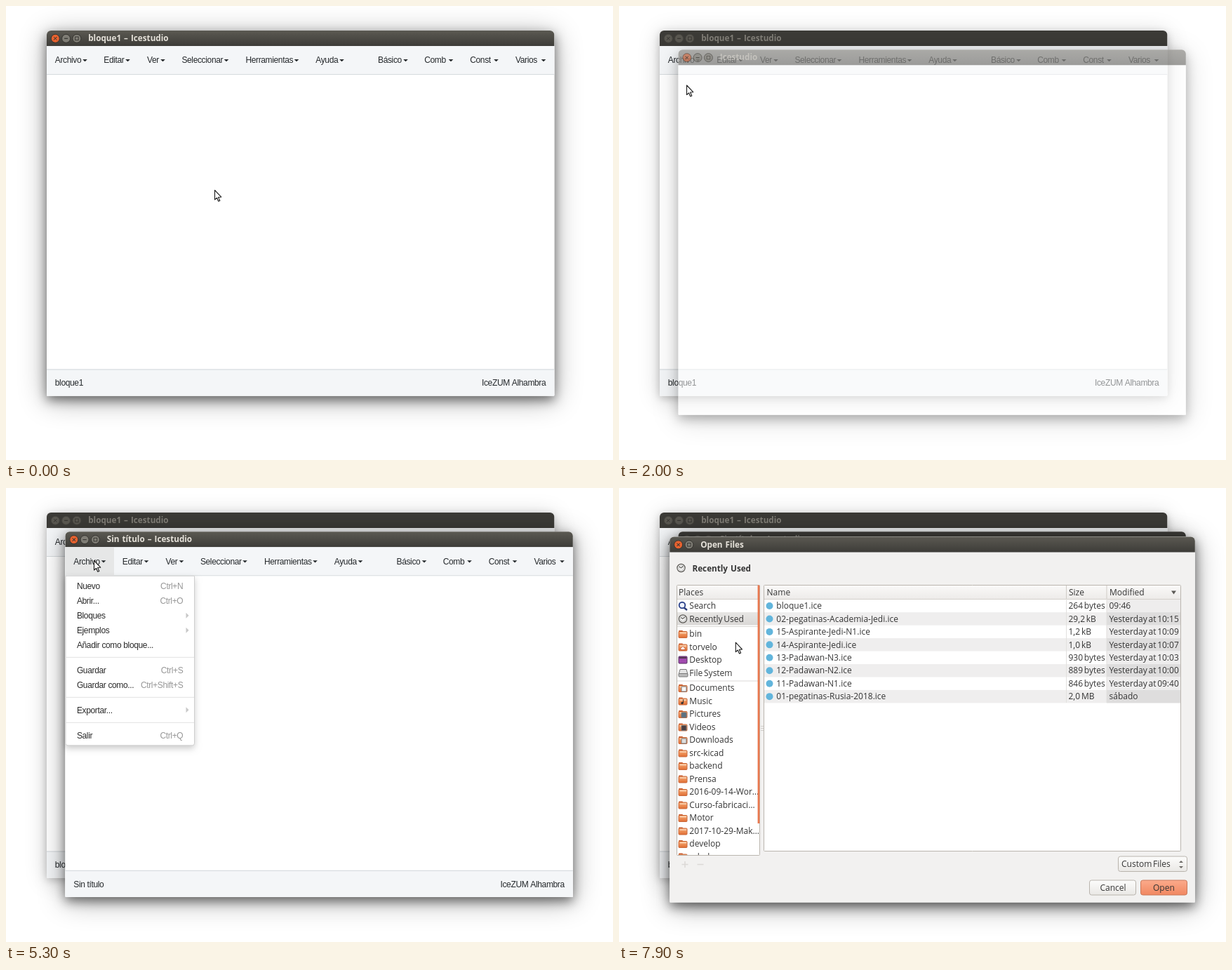
An HTML page with a canvas for the animation above (8 s loop, 865 px wide and 647 px high).

```html
<!DOCTYPE html>
<html lang="es">
<head>
<meta charset="utf-8">
<title>Icestudio</title>
<style>
  html, body { margin: 0; width: 100%; height: 100%; overflow: hidden; background: #fff; }
  canvas { display: block; }
</style>
</head>
<body>
<canvas id="stage" width="865" height="647"></canvas>
<script>
const c = document.getElementById('stage').getContext('2d');
const LOOP = 8000;
const APP = { font: '12px "Liberation Sans", Arial, sans-serif', letterSpacing: '-0.36px', wordSpacing: '0px' };
const UI = { font: '12px "Open Sans", "Noto Sans", sans-serif', letterSpacing: '0px', wordSpacing: '-1.4px' };
const BOLD = { font: 'bold 11.7px "Open Sans", "Noto Sans", sans-serif', letterSpacing: '0px', wordSpacing: '1px' };

// label, label x, caret x
const NAV = [
  ['Archivo', 69.8, 112.5], ['Editar', 139.3, 173.5], ['Ver', 201, 223.5],
  ['Seleccionar', 250.4, 314], ['Herramientas', 341.4, 414], ['Ayuda', 441.3, 478.5],
  ['Básico', 530, 569.5], ['Comb', 596.2, 634], ['Const', 661.2, 698.5], ['Varios', 726, 766]
];
// label, row centre, shortcut ('>' opens a submenu)
const MENU = [
  ['Nuevo', 112.5, 'Ctrl+N'], ['Abrir...', 133.5, 'Ctrl+O'], ['Bloques', 154.5, '>'],
  ['Ejemplos', 175.5, '>'], ['Añadir como bloque...', 196.5, ''], ['Guardar', 232, 'Ctrl+S'],
  ['Guardar como...', 253, 'Ctrl+Shift+S'], ['Exportar...', 289, '>'], ['Salir', 325, 'Ctrl+Q']
];
// pointer moves: first step, last step, target x, y (one step every 100 ms)
const MOVES = [
  [100, 900, 91, 76], [1200, 1500, 96, 112.5], [3000, 3000, 169, 154], [3300, 3300, 165, 174],
  [3500, 3500, 161.7, 187.5], [4800, 4900, 137, 123], [5100, 5100, 125, 103],
  [5700, 5800, 153, 175], [6300, 6300, 153, 273.5], [6500, 6500, 158, 275],
  [6800, 6800, 158, 205], [7000, 7100, 161, 212.5], [7500, 7500, 175, 219], [7600, 7600, 165.8, 219.7]
];
// hovered menu row from each time on
const HOVER = [[0, -1], [1400, 0], [1800, -1], [5700, 0], [5800, 1], [6300, 6], [6800, -1], [7000, 3], [7100, 4]];
const FILES = [
  ['bloque1.ice', '264 bytes', '09:46'],
  ['02-pegatinas-Academia-Jedi.ice', '29,2 kB', 'Yesterday at 10:15'],
  ['15-Aspirante-Jedi-N1.ice', '1,2 kB', 'Yesterday at 10:09'],
  ['14-Aspirante-Jedi.ice', '1,0 kB', 'Yesterday at 10:07'],
  ['13-Padawan-N3.ice', '930 bytes', 'Yesterday at 10:03'],
  ['12-Padawan-N2.ice', '889 bytes', 'Yesterday at 10:00'],
  ['11-Padawan-N1.ice', '846 bytes', 'Yesterday at 09:40'],
  ['01-pegatinas-Rusia-2018.ice', '2,0 MB', 'sábado']
];
const PLACES = [
  [168, 'Search', 'Recently Used'],
  [208, 'bin', 'torvelo', 'Desktop', 'File System'],
  [285, 'Documents', 'Music', 'Pictures', 'Videos', 'Downloads', 'src-kicad', 'backend', 'Prensa',
    '2016-09-14-Wor…', 'Curso-fabricaci…', 'Motor', '2017-10-29-Mak…', 'develop', 'schola']
];

function rect(x, y, w, h, fill) {
  c.fillStyle = fill;
  c.fillRect(x, y, w, h);
}
function text(s, x, y, style, fill, align = 'left') {
  Object.assign(c, style);
  c.fillStyle = fill;
  c.textAlign = align;
  c.textBaseline = 'alphabetic';
  c.fillText(s, x, y + 4.2);
}
function poly(points, fill, stroke, width = 1) {
  c.beginPath();
  for (let i = 0; i < points.length; i += 2) c.lineTo(points[i], points[i + 1]);
  c.closePath();
  if (fill) { c.fillStyle = fill; c.fill(); }
  if (stroke) { c.strokeStyle = stroke; c.lineWidth = width; c.stroke(); }
}
function line(x1, y1, x2, y2, stroke, width = 1) {
  poly([x1, y1, x2, y2], null, stroke, width);
}
function circle(x, y, r, fill, stroke, width = 1) {
  c.beginPath();
  c.arc(x, y, r, 0, 7);
  if (fill) { c.fillStyle = fill; c.fill(); }
  if (stroke) { c.strokeStyle = stroke; c.lineWidth = width; c.stroke(); }
}
function box(x, y, w, h, r, fill, stroke) {
  c.beginPath();
  c.roundRect(x, y, w, h, r);
  c.fillStyle = fill;
  c.fill();
  if (stroke) { c.strokeStyle = stroke; c.lineWidth = 1; c.stroke(); }
}
function fade(y1, y2, from, to) {
  const g = c.createLinearGradient(0, y1, 0, y2);
  g.addColorStop(0, from);
  g.addColorStop(1, to);
  return g;
}
// shadow of a rounded box, painted only outside the box
function shadow(x, y, w, h, r, alpha, blur, dy) {
  c.save();
  c.beginPath();
  c.rect(-100, -100, 1100, 900);
  c.roundRect(x, y, w, h, r);
  c.clip('evenodd');
  c.shadowColor = `rgba(0,0,0,${alpha})`;
  c.shadowBlur = blur;
  c.shadowOffsetY = dy;
  box(x, y, w, h, r, '#fff');
  c.restore();
}

function frame(x, y, w, h, title, active, fill, glyphs) {
  const corners = [6, 6, 1, 1];
  shadow(x, y, w, h, corners, active ? 0.33 : 0.18, active ? 40 : 32, active ? 6 : 4);
  shadow(x, y, w, h, corners, active ? 0.5 : 0.2, active ? 16 : 12, active ? 6 : 3);
  box(x, y, w, h, corners, fill);
  box(x, y, w, 22, [6, 6, 0, 0], active ? fade(y, y + 22, '#5b5952', '#3d3c38') : '#3c3b37');
  const by = y + 11.3, ink = active ? '#3a3935' : '#3a3834';
  [...glyphs].forEach((g, i) => {
    const bx = x + 12.3 + i * 15.3;
    circle(bx, by, 6, !active ? '#5a5851' : i ? '#7f7d75' : '#e8622f', active ? '#34332f' : '#46443f');
    if (g === 'x') {
      line(bx - 2, by - 2, bx + 2, by + 2, ink);
      line(bx - 2, by + 2, bx + 2, by - 2, ink);
    } else if (g === '-') line(bx - 2.5, by, bx + 2.5, by, ink);
    else { c.strokeStyle = ink; c.lineWidth = 1; c.strokeRect(bx - 2.3, by - 2.3, 4.6, 4.6); }
  });
  text(title, x + 13.3 + glyphs.length * 15.3, y + 10.8, BOLD, active ? '#e6e2da' : '#827f78');
}

// stage: 0 empty, 1 bars, 2 carets, 3 labels, 4 complete
function appWindow(dx, dy, name, active, stage, menuOpen, hover) {
  c.save();
  c.translate(dx, dy);
  frame(58, 35, 723.3, 520.5, stage > 3 ? name + ' – Icestudio' : 'Icestudio', active, '#fff', 'x-o');
  if (stage > 0) {
    rect(58, 57, 723.3, 40, '#f4f6f8');
    rect(58, 97, 723.3, 1, '#d5dadd');
    rect(58, 518, 723.3, 37.5, '#f4f6f8');
    rect(58, 517.5, 723.3, 1, '#d0d6da');
  }
  if (menuOpen) rect(58, 57, 69.5, 40, '#e6e7e7');
  if (stage > 1) NAV.forEach(([label, x, caret], i) => {
    if (stage < 3) caret = i < 6 ? 73 + 31 * i : 766 - 31 * (9 - i);
    else text(label, x, 77, APP, '#24282b');
    poly([caret - 3.3, 75.9, caret + 3.3, 75.9, caret, 79.2], '#24282b');
  });
  if (stage > 2) {
    text(name, 69.8, 537, APP, '#24282b');
    text('IceZUM Alhambra', 769.3, 537, APP, '#24282b', 'right');
  }
  if (menuOpen) menu(hover);
  c.restore();
}

function menu(hover) {
  shadow(58, 97.5, 184, 242, [0, 0, 3, 3], 0.22, 10, 4);
  box(58.5, 98, 183.5, 241.5, [0, 0, 3, 3], '#fff', '#cfcfcf');
  [214, 271, 307].forEach(y => rect(59, y - 0.5, 182.5, 1, '#e2e2e2'));
  MENU.forEach(([label, y, key], i) => {
    if (i === hover) rect(59, y - 10.5, 182.5, 21, '#f4f4f4');
    text(label, 74.4, y, APP, '#2b2b2b');
    if (key === '>') poly([230, y - 4, 234, y, 230, y + 4], '#c8c8c8');
    else text(key, 225.8, y, APP, '#979797', 'right');
  });
}

function folder(x, y) {
  box(x, y - 5, 6, 4, 1, '#c9582b');
  box(x, y - 3.5, 12, 9, 1, fade(y - 4, y + 5, '#f9b47e', '#e27036'), '#c8693c');
  rect(x + 2, y - 2, 9, 1.2, '#fde0c8');
}
function clock(x, y) {
  circle(x, y, 5.6, '#f4f4f3', '#55534f', 1.2);
  line(x - 3, y - 2, x, y, '#55534f');
  line(x, y, x + 3, y - 3, '#55534f');
  circle(x, y, 3.6, null, '#aaa', 0.7);
}
function placeIcon(name, x, y) {
  if (name === 'Search') {
    line(x + 7, y + 2, x + 12, y + 6, '#2b3c78', 2.4);
    circle(x + 5, y - 1, 4.3, '#eef3ff', '#30468c', 1.9);
  } else if (name === 'Recently Used') clock(x + 6, y);
  else if (name === 'Desktop') {
    box(x, y - 5, 12, 10, 1, '#a24bb0', '#55305f');
    rect(x + 1, y - 4, 10, 2, '#52384f');
  } else if (name === 'File System') {
    poly([x + 2, y - 5, x + 11, y - 5, x + 13, y + 2, x, y + 2], '#e4e4e4', '#777');
    box(x, y + 1, 13, 4.5, 1, '#bcbcbc', '#777');
  } else {
    folder(x, y);
    const badge = { Documents: '#f6f6f6', Pictures: '#5c7282', Videos: '#493e42', Downloads: '#dedede' }[name];
    if (badge) box(x + 4, y - 2, 7, 7, 0.5, badge, '#777');
    if (name === 'torvelo') poly([x + 6, y - 1, x + 9, y + 2, x + 9, y + 4, x + 3, y + 4, x + 3, y + 2], '#fff', '#b33f1c', 0.7);
    if (name === 'Music') {
      circle(x + 5, y + 3, 1.7, '#3e3533');
      line(x + 6.5, y + 3, x + 6.5, y - 2, '#3e3533');
    }
  }
}

function button(x, y, w, h, label, lx, hot) {
  box(x + 0.5, y + 0.5, w - 1, h - 1, 3,
    hot ? fade(y, y + h, '#fbab8c', '#f18760') : fade(y, y + h, '#fdfdfc', '#e9e7e4'),
    hot ? '#c9795b' : '#b9b4ad');
  text(label, lx, y + h / 2, UI, '#353535');
}

function dialog() {
  const ink = '#353535', border = '#bbb6af';
  frame(72.3, 69.5, 748.5, 521, 'Open Files', true, '#f2f1f0', 'xo');
  clock(88.5, 114);
  text('Recently Used', 104.5, 114.5, BOLD, ink);

  box(82.5, 138.5, 118, 385, 1, '#fff', border);
  rect(83, 139, 115, 19, fade(139, 158, '#faf9f8', '#edebe9'));
  rect(83, 158, 115, 1, '#d4d0cb');
  text('Places', 85, 148.3, UI, ink);
  rect(83, 177, 115, 18.5, fade(177, 195, '#e7e6e4', '#dad8d6'));
  [197, 274.5].forEach(y => rect(83, y, 115, 1, '#dcdad7'));
  c.save();
  c.beginPath();
  c.rect(83, 139, 117, 384);
  c.clip();
  PLACES.forEach(([top, ...names]) => names.forEach((name, i) => {
    const y = top + 18.5 * i;
    placeIcon(name, 85, y);
    text(name, 100.3, y, UI, ink);
  }));
  c.restore();
  rect(197.6, 138.5, 2.8, 339.5, '#e9784f');
  [339, 342, 345].forEach(y => rect(202, y, 4, 1, '#d0cdc9'));

  box(206.5, 138.5, 594, 379, 1, '#fff', border);
  rect(207, 139, 593, 19, fade(139, 158, '#faf9f8', '#edebe9'));
  FILES.forEach(([name, size, date], i) => {
    const y = 168 + 18.45 * i, top = y - 9.3;
    if (i % 2) rect(207, top, 593, 18.5, '#efeeee');
    rect(695, top, 105, 18.5, i % 2 ? '#dedddd' : '#eeeded');
    circle(214.5, y, 5, '#62b5dc');
    text(name, 224.3, y, UI, ink);
    text(size, 640.5, y, UI, ink);
    text(date, 698.5, y, UI, ink);
  });
  rect(207, 158, 593, 1, '#d4d0cb');
  [637, 694.5].forEach(x => {
    rect(x, 139, 1, 19, '#cfcbc6');
    rect(x, 158, 1, 148, '#e2e0de');
  });
  text('Name', 210.5, 148.3, UI, ink);
  text('Size', 641, 148.3, UI, ink);
  text('Modified', 699, 148.3, UI, ink);
  poly([787, 146.5, 794, 146.5, 790.5, 151.5], '#5c5a56');

  line(89.5, 536.5, 98.5, 536.5, '#dcd9d6', 1.5);
  line(94, 532, 94, 541, '#dcd9d6', 1.5);
  line(111.5, 536.5, 120.5, 536.5, '#dcd9d6', 1.5);
  button(711, 524.5, 99, 22.5, 'Custom Files', 716);
  poly([798, 534, 804, 534, 801, 531], '#6b6864');
  poly([798, 539, 804, 539, 801, 542], '#6b6864');
  button(670, 558.5, 67, 22, 'Cancel', 685.5);
  button(743, 558.5, 67, 22, 'Open', 761, true);
}

function pointer(t) {
  let x = 297, y = 262;
  for (const [first, last, toX, toY] of MOVES) {
    if (t < first) break;
    const p = Math.min(1, (Math.floor(t / 100) * 100 - first + 100) / (last - first + 100));
    const e = p * p * (3 - 2 * p);
    x += (toX - x) * e;
    y += (toY - y) * e;
  }
  c.save();
  c.translate(x, y);
  c.lineJoin = 'round';
  const hand = (t >= 1500 && t < 1800) || (t >= 6300 && t < 6500);
  if (hand) poly([0, 0.5, 2, 0.5, 2.5, 5, 7, 5.5, 8.5, 7, 8, 11, 6.5, 13, -0.5, 13, -4.5, 8, -3.5, 6.8, 0, 8.5], '#fff', '#1a1a1a', 1.1);
  else poly([0.5, 0.5, 0.5, 14, 3.5, 11.3, 5.7, 16.3, 7.8, 15.4, 5.6, 10.5, 9.7, 10.2], '#fff', '#1a1a1a', 1.1);
  c.restore();
}

function draw(t) {
  rect(0, 0, 865, 647, '#fff');
  const hover = HOVER.filter(([from]) => t >= from).pop()[1];
  const second = t >= 2000, asking = t >= 7900;
  appWindow(0, 0, 'bloque1', !second, 4, t >= 1000 && t < 1800, hover);
  if (second) {
    const stage = [3700, 3800, 4200, 4300].filter(from => t >= from).length;
    c.globalAlpha = t < 2100 ? 0.5 : 1;
    appWindow(26.5, 27.3, 'Sin título', !asking, stage, t >= 5300 && !asking, hover);
    c.globalAlpha = 1;
  }
  if (asking) dialog();
  pointer(t);
}

function tick() {
  draw(performance.now() % LOOP);
  requestAnimationFrame(tick);
}
tick();
</script>
</body>
</html>
```
